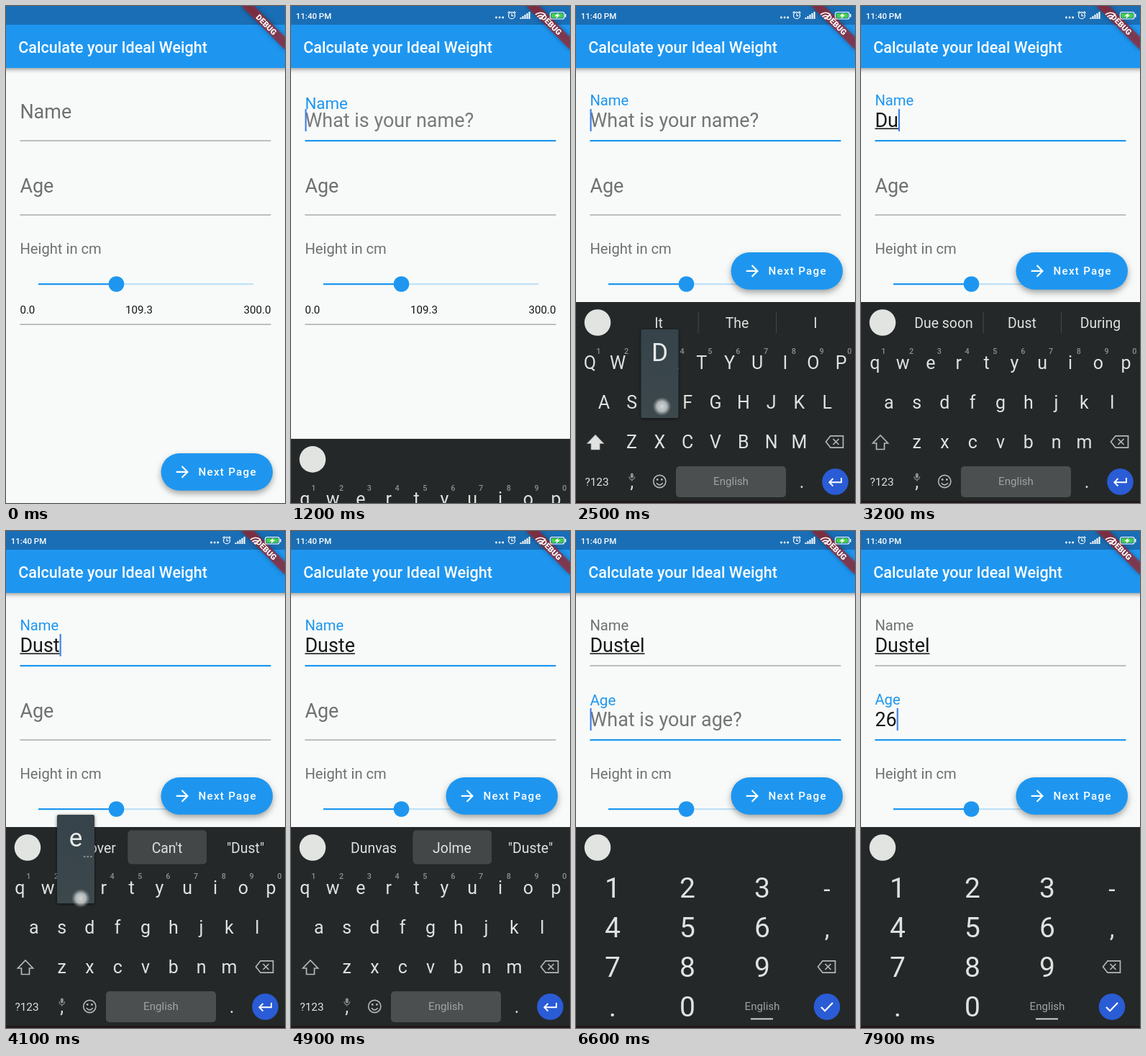
An HTML page with a canvas for the animation above (8 s loop, 388 by 690 pixels).

```html
<!DOCTYPE html>
<html lang="en">
<head>
<meta charset="utf-8">
<title>Calculate your Ideal Weight</title>
<style>
  html, body { margin: 0; width: 100%; height: 100%; overflow: hidden; background: #f7faf8; }
  canvas { display: block; }
</style>
</head>
<body>
<canvas id="stage" width="388" height="690"></canvas>
<script>
const g = document.getElementById('stage').getContext('2d');
const BLUE = '#1e96f0', GRAY = '#6e7170', INK = '#161817', KEY = '#dfe2e0', DIM = '#8c9090', KB = '#242828';
const LOOP = 8000, KB_TOP = 411, COMMIT = 80, HOLD = 180, LAG = 100;
const FOCUS_NAME = 1137, FOCUS_AGE = 6480, NUMPAD = 6600;
const ROWS = ['qwertyuiop', 'asdfghjkl', 'zxcvbnm'];

// Touches: time down, key, finger offset from the key centre
const TAPS = [
  [2080, 'shift', 2, 3], [2500, 'd', 3, 5], [2950, 'u', 3, 6], [3420, 's', 4, 4], [3780, 't', 3, 8],
  [4060, 'e', 7, 14], [5600, 'l', 4, -6], [6400, 'enter', -2, 2], [7150, '2', 3, 5], [7570, '6', 3, 4]
];
const SUGGEST = [
  ['It', 'The', 'I'],
  ['Do', 'Did', 'During'],
  ['Due soon', 'Dust', 'During'],
  ['Dusk', 'Dust', '"Dus"'],
  ['Due over', "Can't", '"Dust"', true],
  ['Dunvas', 'Jolme', '"Duste"', true],
  ['Dunvel', 'Dorsel', '"Dustel"', true]
];

const clamp = v => Math.max(0, Math.min(1, v));
const easeOut = (v, n) => 1 - (1 - clamp(v)) ** n;

function text(s, x, y, size, color, align = 'left', weight = 400) {
  g.font = `${weight} ${size}px Roboto, sans-serif`;
  g.textAlign = align;
  g.fillStyle = color;
  g.fillText(s, x, y);
  return g.measureText(s).width;
}
function rect(x, y, w, h, color) {
  g.fillStyle = color;
  g.fillRect(x, y, w, h);
}
function round(x, y, w, h, r, color) {
  g.fillStyle = color;
  g.beginPath();
  g.roundRect(x, y, w, h, r);
  g.fill();
}
function disc(x, y, r, color) {
  g.fillStyle = color;
  g.beginPath();
  g.arc(x, y, r, 0, 7);
  g.fill();
}
function icon(d, x, y, color, width = 0, scale = 1) {
  g.save();
  g.translate(x, y);
  g.scale(scale, scale);
  const p = new Path2D(d);
  if (width) {
    g.strokeStyle = color;
    g.lineWidth = width;
    g.stroke(p);
  } else {
    g.fillStyle = color;
    g.fill(p);
  }
  g.restore();
}
function shadowed(blur, dy, alpha, draw) {
  g.save();
  g.shadowColor = `rgba(0,0,0,${alpha})`;
  g.shadowBlur = blur;
  g.shadowOffsetY = dy;
  draw();
  g.restore();
}

function keyPos(k) {
  const special = { shift: [27, 606], enter: [360, 660], 2: [155, 495], 6: [259, 550] };
  if (special[k]) return special[k];
  const r = ROWS.findIndex(row => row.includes(k));
  return [19.4 * (1 + r + (r > 1)) + 38.8 * ROWS[r].indexOf(k), 496 + 55 * r];
}

function typed(t, from, to, delay = 0) {
  return TAPS.filter(([at, k]) => k.length === 1 && at >= from && at < to && t >= at + COMMIT + delay).map(tap => tap[1]).join('');
}

function cursorOn(t) {
  const marks = [FOCUS_NAME - 10, FOCUS_AGE, ...TAPS.filter(p => p[1].length === 1).map(p => p[0] + COMMIT)];
  const last = Math.max(...marks.filter(m => m <= t));
  return (t - last) % 1000 < 500;
}

// y is the baseline of the resting label
function field(label, hint, value, y, float, focused, composing, t) {
  const scale = 1 - 0.25 * float;
  if (!value && float > 0) {
    g.globalAlpha = clamp(float * 1.4) * (focused ? 1 : 0);
    text(hint, 19.4, y + 12, 26.95, '#737675');
    g.globalAlpha = 1;
  }
  text(label, 19.4, y - 18.5 * float, 26.95 * scale, focused ? BLUE : GRAY);
  const w = value ? text(value, 19.4, y + 12, 26.95, INK) : 0;
  if (value && composing) rect(19.4, y + 13.5, w, 1.6, INK);
  if (focused) rect(19.4, y + 30, 349, 2.2, BLUE);
  else rect(19.4, y + 30.5, 349, 1.1, '#8d908f');
  if (focused && cursorOn(t)) rect(19.4 + w + (w ? 0 : 0.1), y - 13, 2.1, 31, '#3f7de8');
}

function page(t) {
  rect(0, 0, 388, 690, '#f7faf8');
  const onAge = t >= FOCUS_AGE, name = typed(t, 0, 6000);
  field('Name', 'What is your name?', name && name[0].toUpperCase() + name.slice(1), 156,
    easeOut((t - FOCUS_NAME) / 200, 3), t >= FOCUS_NAME && !onAge, true, t);
  field('Age', 'What is your age?', typed(t, 7000, LOOP), 259,
    easeOut((t - FOCUS_AGE) / 200, 3), onAge, false, t);

  text('Height in cm', 19.4, 344, 20.2, GRAY);
  rect(45, 385, 299, 2.2, '#bfe1f7');
  rect(45, 385, 108, 2.2, BLUE);
  disc(153.5, 386, 10.8, BLUE);
  text('0.0', 19.4, 426.5, 15.1, INK);
  text('109.3', 185, 426.5, 15.1, INK, 'center');
  text('300.0', 368.4, 426.5, 15.1, INK, 'right');
  rect(19.4, 441.5, 349, 1.1, '#8d908f');

  const y = t < 1400 ? 621 : 342;
  shadowed(9, 4, 0.35, () => round(215.5, y, 155.5, 51.8, 25.9, BLUE));
  icon('M12 4l-1.41 1.41L16.17 11H4v2h12.17l-5.58 5.59L12 20l8-8z', 232.4, y + 13, '#fff', 0, 1.078);
  g.letterSpacing = '1.3px';
  text('Next Page', 267.5, y + 31.3, 15.1, '#fff', 'left', 500);
  g.letterSpacing = '0px';

  shadowed(6, 2, 0.4, () => rect(-10, 26, 408, 60, BLUE));
  rect(0, 0, 388, 26, '#1a6eb5');
  text('Calculate your Ideal Weight', 17.2, 64.6, 21.56, '#fff', 'left', 500);
}

function banner() {
  g.save();
  g.translate(388, 0);
  g.rotate(Math.PI / 4);
  shadowed(7, 0, 0.5, () => rect(-43.1, 30.2, 86.2, 12.9, 'rgba(183,28,28,.63)'));
  text('DEBUG', 0, 40.6, 11, '#fff', 'center', 900);
  g.restore();
}

function statusBar(t) {
  g.globalAlpha = clamp((t - 150) / 250);
  text('11:40 PM', 6.8, 17.5, 11.5, '#fff', 'left', 500);
  for (let i = 0; i < 3; i++) disc(285.5 + 4.6 * i, 16, 1.4, '#fff');
  icon('M4.5 0a4.5 4.5 0 1 1-9 0a4.5 4.5 0 1 1 9 0M0-3V.5H2.5M-5.5-3.5L-3-5.7M5.5-3.5L3-5.7', 307, 13.2, '#fff', 1.2);
  for (let i = 0; i < 5; i++) rect(318.5 + 3 * i, 16 - 2 * i, 2, 2 + 2 * i, '#fff');
  icon('M-7-5Q0-10.5 7-5M-4.6-2Q0-5.6 4.6-2', 347, 17, '#fff', 1.7);
  icon('M0 2L-3-.5Q0-2.5 3-.5z', 347, 17, '#fff');
  g.strokeStyle = '#fff';
  g.lineWidth = 1.2;
  g.beginPath();
  g.roundRect(360.5, 8.5, 19.5, 9.5, 2.5);
  g.stroke();
  rect(381, 11, 1.5, 4.5, '#fff');
  round(362, 10, 16.5, 6.5, 1, '#43cf4b');
  icon('M2-4L-4 1H-.5L-2 4.5L4-.8H.6z', 370.3, 13.2, '#fff');
  g.globalAlpha = 1;
}

function backspace(x) {
  icon('M-12.5 0L-6-8.2H11.5V8.2H-6zM-2.5-4L5.5 4M5.5-4L-2.5 4', x, 605, '#b4b8b6', 1.7);
}

function letterKeys(t) {
  const caps = t >= 2080 + COMMIT && t < 2500 + HOLD;
  ROWS.forEach((row, r) => [...row].forEach((k, i) => {
    const [x, y] = keyPos(k);
    text(caps ? k.toUpperCase() : k, x, y + 7.5, 25, KEY, 'center');
    if (!r) text((i + 1) % 10, x + 11.8, 482.7, 10.8, DIM, 'center', 500);
  }));
  const arrow = 'M0-10L10.5 1H5.5V9.5H-5.5V1H-10.5z';
  icon(arrow, 27, 606, '#b4b8b6', 1.7);
  if (caps) icon(arrow, 27, 606, KEY);
  backspace(360);
  text('?123', 29, 666, 15.4, KEY, 'center');
  text(',', 77.8, 669, 25, KEY, 'center');
  round(75.8, 648.5, 4, 7, 2, DIM);
  icon('M-3.8-2.5Q-3.8 2 0 2T3.8-2.5M0 2V4.5', 77.8, 655.5, DIM, 1.1);
  icon('M8.6 0a8.6 8.6 0 1 1-17.2 0a8.6 8.6 0 1 1 17.2 0M-4.5 2.2Q0 7.5 4.5 2.2', 116.3, 660, '#b4b8b6', 1.6);
  disc(113.2, 657.5, 1.4, '#b4b8b6');
  disc(119.4, 657.5, 1.4, '#b4b8b6');
  round(139, 639, 153, 43, 5, '#4b4f4f');
  text('English', 215.5, 665.3, 15.1, '#a0a4a3', 'center');
  text('.', 314, 669, 25, KEY, 'center');
  disc(360.5, 660.5, 18.3, '#2a5cd6');
  icon('M8.5-5.5V.8H-8M-3-4.5L-8.2.8L-3 6', 360.5, 660.5, '#fff', 1.9);
}

function numberKeys() {
  ['123-', '456,', '789', '.0'].forEach((row, r) => [...row].forEach((k, i) =>
    text(k, [51, 155, 259, 349][i], 509 + 55 * r, i > 2 ? 34 : 39, KEY, 'center')));
  backspace(349);
  text('English', 259, 665.3, 15.1, '#a0a4a3', 'center');
  rect(243, 676.5, 31, 1.8, KEY);
  disc(349, 660.5, 18.3, '#2a5cd6');
  icon('M-8 .5L-2.8 5.7L8-5.5', 349, 660.5, '#fff', 2.2);
}

function keyboard(t) {
  if (t < 1159) return;
  g.save();
  g.translate(0, 279 * (1 - easeOut((t - 1159) / 240, 2)));
  rect(0, KB_TOP, 388, 279, KB);
  disc(30, 439.5, 18.3, '#e1e4e1');
  if (t >= NUMPAD) {
    numberKeys();
  } else {
    letterKeys(t);
    if (t >= 1420) {
      const words = SUGGEST[typed(t, 0, 6000, LAG).length];
      rect(169.5, 425, 1, 29, '#454a4a');
      rect(278, 425, 1, 29, '#454a4a');
      if (words[3]) round(169.5, 415.5, 109.5, 47, 5, '#434747');
      words.slice(0, 3).forEach((w, i) => text(w, 115 + 109 * i, 446.6, 19.4, KEY, 'center'));
    }
  }
  rect(0, 687, 388, 3, '#22181c');
  g.restore();
}

function popup(k, x, y, caps) {
  const fill = g.createLinearGradient(0, y - 102, 0, y + 21);
  fill.addColorStop(0, '#36434a');
  fill.addColorStop(1, '#3c484c');
  shadowed(4, 1, 0.6, () => round(x - 26, y - 102, 52, 123, 2, fill));
  text(caps ? k.toUpperCase() : k, x, y - 58, 35, '#e8ebea', 'center');
  if ('euioasnc'.includes(k)) for (let i = 0; i < 3; i++) rect(x + 11 + 4.6 * i, y - 45, 2.4, 2.2, DIM);
}

function touch(x, y) {
  const glow = g.createRadialGradient(x, y, 0, x, y, 13);
  glow.addColorStop(0, 'rgba(225,229,229,.9)');
  glow.addColorStop(0.55, 'rgba(205,210,210,.8)');
  glow.addColorStop(0.75, 'rgba(170,176,178,.5)');
  glow.addColorStop(1, 'rgba(150,156,158,0)');
  disc(x, y, 13, glow);
}

function fingers(t) {
  if (t >= 980 && t < 1110) touch(190, 157);
  for (const [at, k, dx, dy] of TAPS) {
    if (t < at || t >= at + HOLD) continue;
    const [x, y] = keyPos(k);
    if (/^[a-z]$/.test(k)) popup(k, x, y, at === 2500);
    touch(x + dx, y + dy);
  }
}

function frame(now) {
  const t = now % LOOP;
  page(t);
  banner();
  statusBar(t);
  keyboard(t);
  fingers(t);
  requestAnimationFrame(frame);
}
requestAnimationFrame(frame);
</script>
</body>
</html>
```
